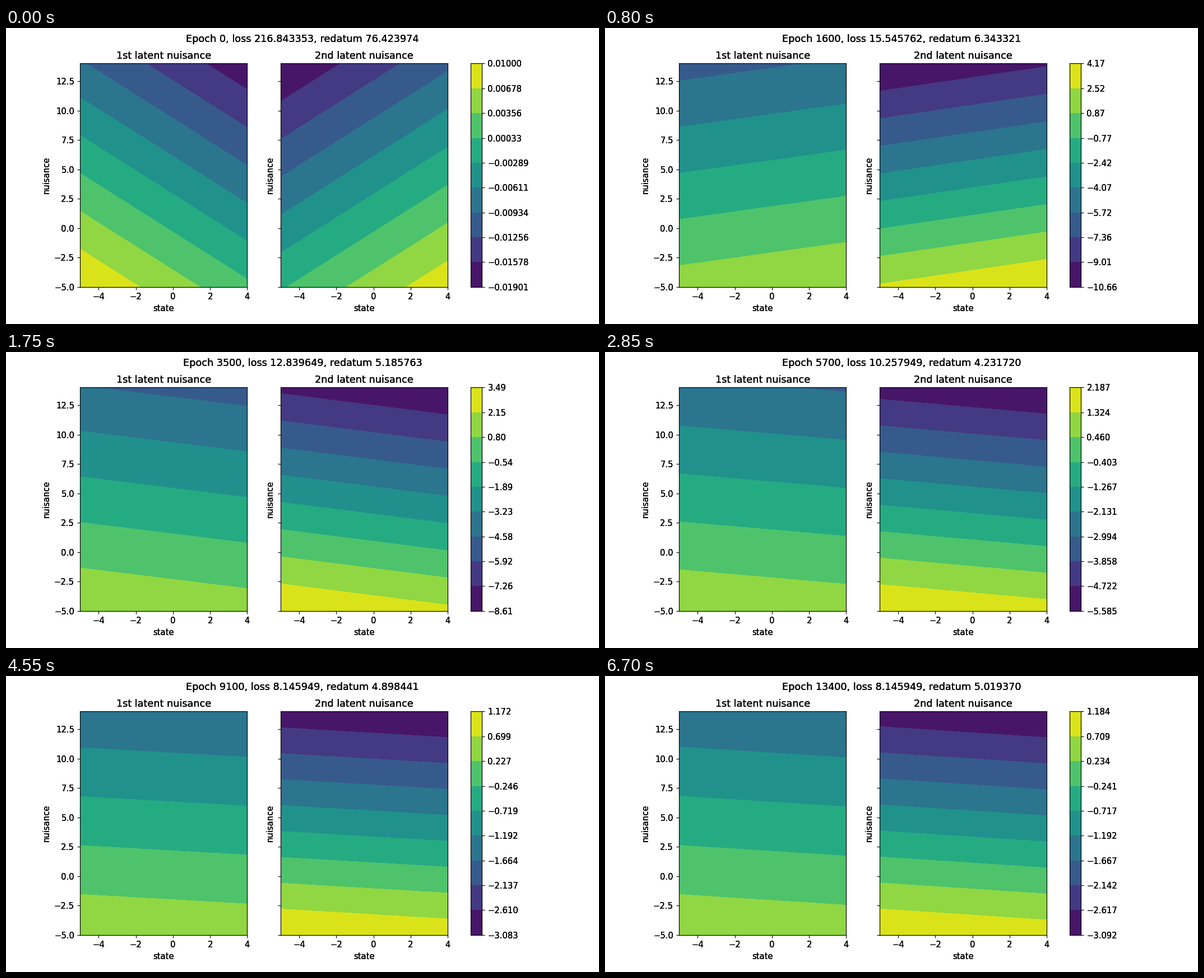
Write a matplotlib script that moves like this. It is 1058 px wide and 529 px high and loops after 6.75 s.

```python
import math

import matplotlib.pyplot as plt
import numpy as np
from matplotlib.animation import FuncAnimation
from matplotlib.text import Text

FRAMES, INTERVAL = 135, 50
STEP = 100          # epochs per frame
BANDS = 9
WARMUP = 265        # decay of the initial state, in epochs
ANNEAL = 7500       # epoch at which the weights have settled
INK = 3             # passes per text, for dense strokes


def left(e):
    return max(0.0, 1 - e / ANNEAL)


def settle(curve, start, e):
    """Leave the start value and decay onto the curve."""
    return curve(e) + (start - curve(0)) * math.exp(-e / WARMUP)


def loss(e):
    return 8.145949 + 8.8 * left(e)


def redatum(e):
    dip = math.exp(-((e - 5700) / 2400) ** 2)
    return 5.0194 + 1.95 * left(e) ** 2 - 0.9 * dip


def strength(e):
    """Size of the nuisance weight: fast growth, then a slow decline."""
    size = 0.2145 + 0.705 * left(e) - 0.205 * left(e) ** 5
    return size * math.tanh((e + 0.77) / 550)


def tilt(e):
    """State weight over nuisance weight, a damped swing."""
    swing = math.exp(-e / 2300) * math.cos(math.pi * (e - 1000) / 3600)
    return 0.1035 - 0.773 * swing


def ratio(e):
    """Size of the first latent relative to the second."""
    return 0.53 + 0.5 * left(e) ** 2 * (1 - left(e))


def latents(e):
    second = -strength(e)
    first = second * settle(ratio, 1, e)
    tilt1 = settle(lambda t: 0.97 * tilt(t), 1, e)
    tilt2 = settle(tilt, -1, e)
    return [first * (tilt1 * X + Y), second * (tilt2 * X + Y)]


def level_labels(levels):
    digits = max(0, 3 - math.floor(math.log10(levels[-1] - levels[0])))
    return [f"{v:.{digits}f}".replace("-", "\u2212") for v in levels]


def thicken(text):
    draw = text.draw

    def draw_passes(renderer):
        for _ in range(INK):
            draw(renderer)

    text.draw = draw_passes


plt.rcParams.update({"font.family": "DejaVu Sans", "font.size": 10})
fig = plt.figure(figsize=(10, 5), dpi=105.8, facecolor="white")
gs = fig.add_gridspec(1, 2, left=0.125, right=0.745, bottom=0.125, top=0.88,
                      wspace=0.2)
axes = gs.subplots(sharey=True)
for ax, name in zip(axes, ("1st", "2nd")):
    ax.set(title=f"{name} latent nuisance", xlabel="state", ylabel="nuisance",
           xlim=(-5, 4), ylim=(-5, 14))
heading = fig.suptitle("")

cax = fig.add_axes([0.78375, 0.125, 0.755 / 40, 0.755])
cax.pcolormesh([0, 1], np.arange(BANDS + 1), np.arange(BANDS)[:, None] + 0.5,
               cmap="viridis", vmin=0, vmax=BANDS)
cax.set(xticks=[], yticks=range(BANDS + 1), ylim=(0, BANDS))
cax.yaxis.tick_right()

X, Y = np.meshgrid([-5.0, 4.0], [-5.0, 14.0])
fills = []


def update(i):
    e = i * STEP
    fields = latents(e)
    levels = np.linspace(np.min(fields), np.max(fields), BANDS + 1)
    while fills:
        fills.pop().remove()
    for ax, z in zip(axes, fields):
        fills.append(ax.contourf(X, Y, z, levels=levels, cmap="viridis",
                                 vmin=levels[0], vmax=levels[-1]))
    cax.set_yticklabels(level_labels(levels))
    heading.set_text(f"Epoch {e}, loss {settle(loss, 216.843353, e):.6f}, "
                     f"redatum {settle(redatum, 76.423974, e):.6f}")
    return []


update(0)
fig.canvas.draw()
for label in fig.findobj(Text):
    thicken(label)

anim = FuncAnimation(fig, update, frames=FRAMES, interval=INTERVAL,
                     init_func=lambda: update(0), repeat=True, repeat_delay=0,
                     blit=False)
plt.show()
```
